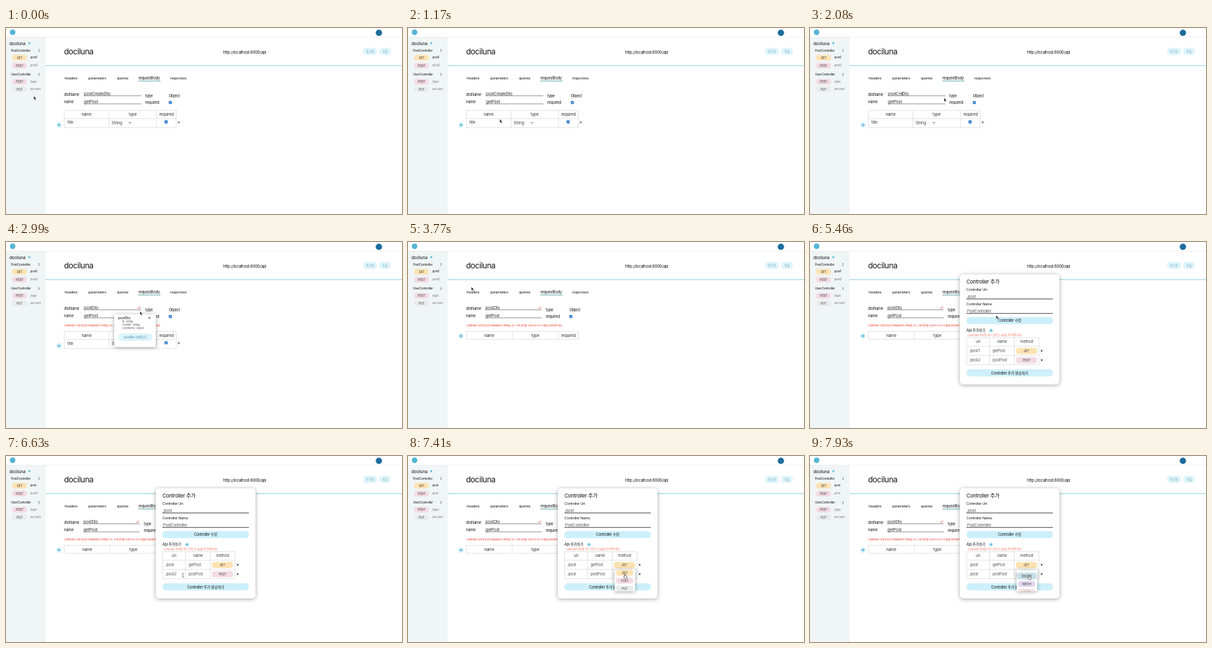
Recreate the animation shown at these times as an HTML page. Size 600x282 px, loop 8000 ms.

```html
<!DOCTYPE html>
<html lang="ko">
<head>
<meta charset="utf-8">
<title>API editor</title>
<style>
html, body { margin: 0; width: 100%; height: 100%; overflow: hidden; background: #fff; }
svg { display: block; width: 100vw; height: 100vh; }
text { font-family: Inter, "Noto Sans CJK KR", "Noto Sans CJK", sans-serif; letter-spacing: -.04em; white-space: pre; }
.shadow { filter: drop-shadow(0 1px 3px rgba(0, 0, 0, .35)); }
</style>
</head>
<body>
<svg id="stage" viewBox="0 0 600 282"></svg>
<script>
const LOOP = 8000, FIRST = 650, TICK = 130;
const stage = document.getElementById('stage');
const BRAND = 'dociluna';
const INK = '#151515', GREY = '#555', RULE = '#cfcfcf', RED = '#f0362b', AQUA = '#cdf0fb';
const METHOD = { GET: '#fde3b3', POST: '#f3dbe3', PUT: '#e8ecec', DELETE: '#c6dfe6', PATCH: '#e3d7ee', HEAD: '#f8dede' };

// Event times in ms
const AT = {
  caret: 1560, erase: 1820, typed: 2470, warn: 2600, popup: 2730, reuse: 3510,
  menu: 4290, hover: 4680, modal: 4940, cut1: 6110, save1: 6500, cut2: 6760, save2: 6890,
  list: 7150, scroll: 7410, scrolled: 7800
};

// Pointer path: time, x, y, shape
const PATH = [
  [0, 42, 103, 'arrow'], [520, 42, 103, 'arrow'], [780, 66, 134, 'arrow'], [1040, 116, 160, 'arrow'],
  [1300, 162, 116, 'arrow'], [1430, 174, 99, 'beam'], [1560, 149, 100, 'beam'], [1690, 180, 103, 'beam'],
  [1820, 203, 106, 'arrow'], [2990, 203, 105, 'arrow'], [3250, 197, 143, 'hand'], [3510, 195, 143, 'hand'],
  [3640, 142, 104, 'arrow'], [3900, 50, 32, 'hand'], [4160, 50, 32, 'hand'], [4420, 79, 36, 'arrow'],
  [4940, 79, 36, 'arrow'], [5200, 190, 82, 'arrow'], [5460, 282, 111, 'arrow'], [5720, 301, 142, 'arrow'],
  [5980, 259, 166, 'beam'], [6370, 261, 168, 'beam'], [6500, 268, 181, 'beam'], [6760, 268, 181, 'beam'],
  [7020, 328, 179, 'hand'], [7410, 328, 179, 'hand'], [7670, 331, 181, 'hand']
];

const text = (x, y, s, size = 5.5, fill = INK, anchor = 'start', extra = '') =>
  `<text x="${x}" y="${y + size * .36}" font-size="${size}" fill="${fill}" text-anchor="${anchor}" ${extra}>${s}</text>`;
const mid = (x, y, s, size, fill) => text(x, y, s, size, fill, 'middle');
const rect = (x, y, w, h, fill, r = 0, extra = '') =>
  `<rect x="${x}" y="${y}" width="${w}" height="${h}" rx="${r}" fill="${fill}" ${extra}/>`;
const path = (d, stroke = RULE, w = .6) => `<path d="${d}" fill="none" stroke="${stroke}" stroke-width="${w}"/>`;
const dot = (x, y, r, fill) => `<circle cx="${x}" cy="${y}" r="${r}" fill="${fill}"/>`;
const pill = (x, y, w, h, name) =>
  rect(x - w / 2, y - h / 2, w, h, METHOD[name], h / 2.4) + mid(x, y, name, 4.4, '#333');
const plus = (x, y, r) => dot(x, y, r, '#dff4fb') +
  path(`M${x - r * .6} ${y}h${r * 1.2}M${x} ${y - r * .6}v${r * 1.2}`, '#259cc0', .8);
const cross = (x, y) => path(`M${x - 1.3} ${y - 1.3}l2.6 2.6m0 -2.6l-2.6 2.6`, INK, .8);
const checkbox = (x, y) => rect(x - 2.3, y - 2.3, 4.6, 4.6, '#2375c8', .9) +
  path(`M${x - 1.3} ${y}l1 1.1 1.7 -2.2`, '#fff', .7);
const grid = (xs, ys) => path(
  ys.map(y => `M${xs[0]} ${y}H${xs.at(-1)}`).join('') + xs.map(x => `M${x} ${ys[0]}V${ys.at(-1)}`).join(''));

function sidebar(t) {
  const route = (y, method, label, fill) => pill(20.5, y, 22, 8.6, method) + text(36.5, y - .5, label, 4.2, fill);
  const group = (y, name) => text(7.5, y, name, 4.8) + [-1.6, 0, 1.6].map(d => dot(50, y + d, .5, INK)).join('');
  return rect(0, 14, 60, 268, '#f0f5f5') + text(5, 23.5, BRAND, 6.6) + plus(35.3, 23, 2.6) +
    group(34, 'PostController') +
    route(45, 'GET', t < AT.save1 ? '/post1' : '/post', INK) +
    route(57, 'POST', t < AT.save2 ? '/post2' : '/post', '#777') +
    group(70.5, 'UserController') +
    route(81.5, 'POST', '/login', '#777') + route(93, 'PUT', '/account', '#777');
}

function header() {
  const button = (x, w, label) => rect(x, 30, w, 11, '#e0f5fb', 4.5) + mid(x + w / 2, 35.6, label, 4.6, '#6fa9b8');
  const tabs = [[89, 'headers'], [124.7, 'parameters'], [168, 'queries'], [249, 'responses']];
  return rect(0, 0, 600, 14, '#fff') + path('M0 14H600', '#e2e4e4', .6) +
    dot(10, 6.5, 4.2, '#55b4d4') + dot(565, 7.3, 4.8, '#1c6c9c') +
    text(88, 35.5, BRAND, 12) + text(329, 36.7, 'http://localhost:8000/api', 6.1) +
    button(541, 21, '동기화') + button(565.5, 17.5, '추출') +
    path('M60 57H600', '#86cdd5', 1) +
    tabs.map(([x, s]) => text(x, 76, s, 5.4)).join('') +
    text(200.7, 75.5, 'requestBody', 5.8) + path('M200.5 80.3H234', '#3a9494', .8);
}

function dtoName(t) {
  const left = t < AT.erase ? 6 : Math.max(0, 5 - Math.floor((t - AT.erase) / TICK));
  return ['post' + 'Create'.slice(0, left), 'Dto'];
}

function form(t) {
  const reused = t >= AT.reuse, warned = t >= AT.warn;
  const dx = reused ? -2.3 : 0, dy = warned ? 10.4 : 0, ix = reused ? 117.3 : 118;
  const split = reused ? 158 : 156, top = 125 + dy;
  let s = text(88, 100.5, 'dtoName', 5.7) + text(88, 112.3, 'name', 5.9) +
    text(ix, 99.3, dtoName(t).join(''), 6.35, '#333', 'start', 'id="dto"') + text(ix, 111.3, 'getPost', 6.4, '#333') +
    path(`M${ix} 102.8H${205 + dx}M${ix} 115H${205 + dx}`, '#444', .6) +
    text(211 + dx, 103.3, 'type', 5.8) + text(211 + dx, 113, 'required', 5.8) +
    text(246.7 + dx, 103.3, 'Object', 5.8) + checkbox(249 + dx, 113);
  if (warned) s += path(`M${199.5 + dx} 99.5l1.6 1.7 2.8 -3.4`, RED, .8) +
    text(88, 127, 'Controller 내에 동일한 DtoName이 존재합니다. 기존 Dto를 사용하시거나 이름을 변경해주세요.', 3.85, RED);
  s += grid([88.3, split, 228, 258], reused ? [top, top + 12] : [top, top + 12.3, top + 26]) +
    mid((88 + split) / 2, top + 6, 'name', 6.1, '#333') + mid((split + 228) / 2, top + 6, 'type', 6.1, '#333') +
    mid(243, top + 6, 'required', 6, '#333');
  if (!reused) s += text(93, top + 18.3, 'title', 5.9, '#444') + text(160, top + 18.3, 'String', 6.2, '#444') +
    path(`M186 ${top + 17.7}l1.8 1.7 1.8 -1.7`, '#333', .8) + checkbox(242.6, top + 17.4) + cross(261.7, top + 18);
  return s + plus(80.3, reused ? 142.5 : top + 22, 4.5);
}

const popup = () => rect(164, 109.5, 63, 49.5, '#fff', 1, 'class="shadow"') +
  text(170, 115.3, 'postDto', 5.4) + cross(217.4, 115) +
  ['id : String', 'content : String', 'comments : Object'].map((s, i) => text(176, 121 + i * 5, s, 4, GREY)).join('') +
  rect(170, 138.5, 51.5, 11.5, '#dcf4fb', 5) + mid(195.7, 144.4, 'postDto 사용하기', 4.7, '#4a8fa8');

const menu = t => rect(54, 30, 29, 30, '#fff') +
  mid(68.5, 35.5, '수정하기', 4.5, t >= AT.hover ? '#777' : INK) +
  mid(68.5, 46, '삭제하기', 4.5) + mid(68.5, 57, 'Dto 정보 보기', 4.5);

function modal(t) {
  const field = (y, label, value) => text(237, y, label, 5.4) +
    text(238, y + 11, value, 5.9, GREY) + path(`M237 ${y + 14}H368`, '#333', .9);
  const button = (y, label) => rect(237, y, 131, 10.8, AQUA, 5) + mid(302.5, y + 5.5, label, 5.6);
  const row = (y, uri, name, method) => text(242, y, uri, 5.7, GREY) + text(276.5, y, name, 5.7, GREY) +
    pill(328, y + .2, 32, 9.5, method) + cross(351, y);
  return rect(227, 49, 151, 167, '#fff', 5, 'class="shadow"') +
    text(237, 60, 'Controller 추가', 8) +
    field(72.3, 'Controller Uri:', '/post') + field(94.3, 'Controller Name:', 'PostController') +
    button(113.8, 'Controller 수정') +
    text(237, 134.2, 'Api 추가하기', 5.5) + plus(274.3, 134.2, 3.6) +
    text(239, 141.5, 'Controller 정보를 모두 입력 후 Api를 추가해주세요', 4, '#f47563') +
    grid([237.3, 272, 309.5, 347], [145, 158, 172, 186]) +
    mid(254.5, 151, 'uri', 5.8, '#444') + mid(291, 151, 'name', 5.8, '#444') + mid(328, 151, 'method', 5.8, '#444') +
    row(165, t < AT.cut1 ? '/post1' : '/post', 'getPost', 'GET') +
    row(179, t < AT.cut2 ? '/post2' : '/post', 'postPost', 'POST') +
    button(193, 'Controller 추가 완료하기');
}

function methodList(t) {
  const p = Math.min(1, Math.max(0, (t - AT.scroll) / (AT.scrolled - AT.scroll)));
  const scroll = 31 * p * (2 - p);
  return rect(313, 172, 31, 33, '#fff', 1.5, 'class="shadow"') +
    '<clipPath id="view"><rect x="312" y="172" width="33" height="32.5"/></clipPath><g clip-path="url(#view)">' +
    Object.keys(METHOD).map((name, i) => {
      const y = 177 + i * 12 - scroll, hovered = name === 'DELETE' && p === 1;
      return pill(328.3, y, hovered ? 30 : 26, hovered ? 10.5 : 9, name);
    }).join('') + '</g>';
}

const SHAPE = {
  arrow: '<path d="M0 0V5.8L1.4 4.6 2.4 6.7 3.4 6.2 2.4 4.2H4.2Z" fill="#222" stroke="#fff" stroke-width=".45"/>',
  beam: path('M-1 -2.8Q0 -2.8 0 -2Q0 -2.8 1 -2.8M0 -2V2M-1 2.8Q0 2.8 0 2Q0 2.8 1 2.8', '#222', .6),
  hand: '<path d="M0 0Q1 -.6 1.2 .4V2.2L3.6 3Q4.2 3.3 3.9 4.4L3.3 6.5H.6L-1.4 3.8Q-1 2.9 0 3.7Z" fill="#fff" stroke="#222" stroke-width=".6"/>'
};

function pointer(t) {
  const i = PATH.findLastIndex(k => k[0] <= t);
  const a = PATH[i], b = PATH[i + 1] || a;
  const p = b === a ? 0 : (t - a[0]) / (b[0] - a[0]);
  return `<g transform="translate(${a[1] + (b[1] - a[1]) * p} ${a[2] + (b[2] - a[2]) * p})">${SHAPE[a[3]]}</g>`;
}

function draw(t) {
  const during = (from, to, s) => t >= from && t < to ? s(t) : '';
  stage.innerHTML = sidebar(t) + header() + form(t) +
    during(AT.popup, AT.reuse, popup) + during(AT.menu, AT.modal, menu) +
    during(AT.modal, LOOP, modal) + during(AT.list, LOOP, methodList) + pointer(t);
  if (t >= AT.caret && t < AT.warn) {
    const field = document.getElementById('dto');
    const x = 118 + field.getSubStringLength(0, dtoName(t)[0].length);
    stage.insertAdjacentHTML('beforeend', path(`M${x} 96V102.3`, INK, .6));
  }
}

let shown = -1;
function frame() {
  const t = performance.now() % LOOP;
  const step = t < FIRST ? 0 : FIRST + Math.floor((t - FIRST) / TICK) * TICK;
  if (step !== shown) draw(shown = step);
  requestAnimationFrame(frame);
}
frame();
</script>
</body>
</html>
```
